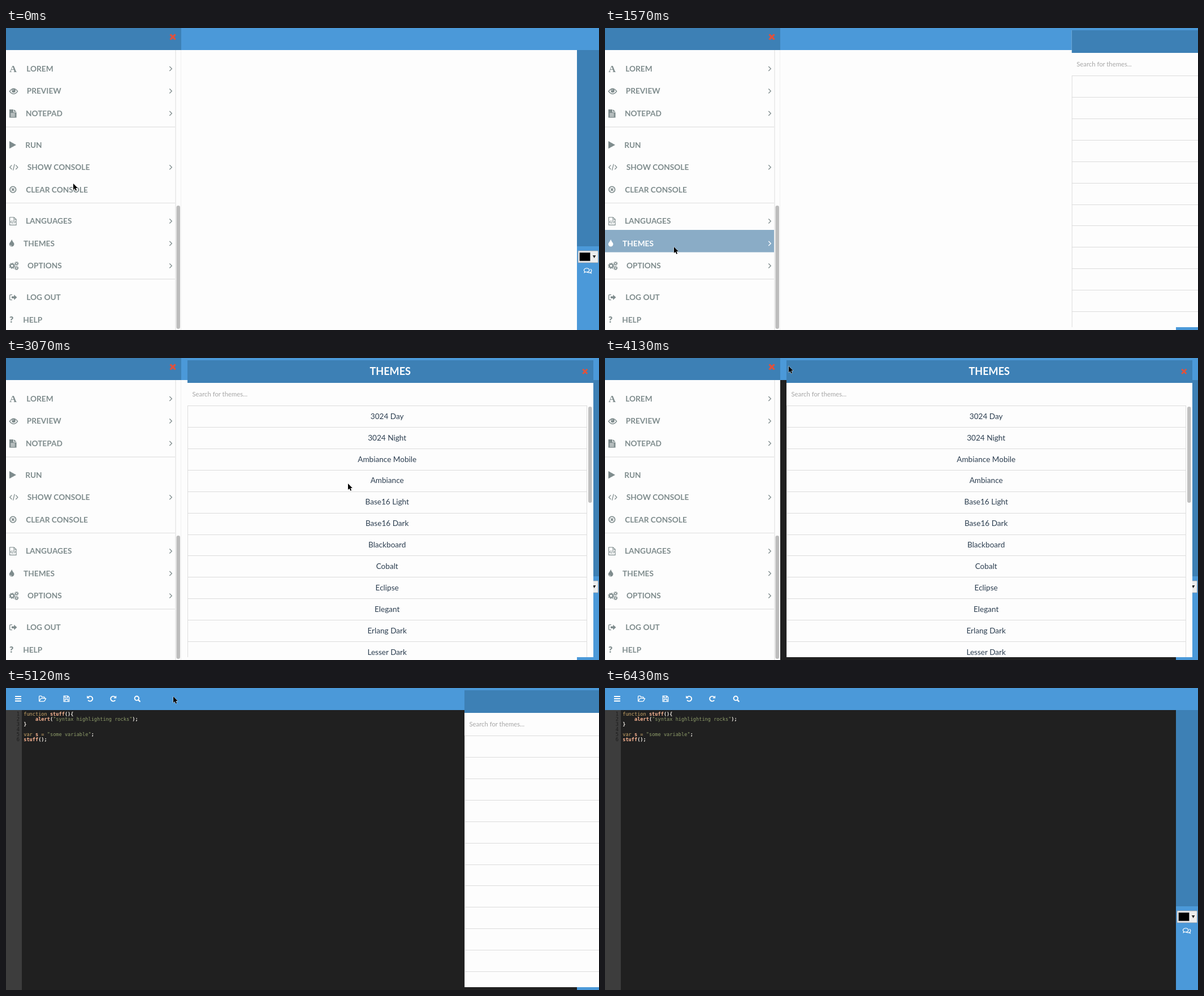
Recreate the animation shown at these times as an HTML page. Size 1049x534 px, loop 6.82 s.

```html
<!DOCTYPE html>
<html lang="en">
<head>
<meta charset="utf-8">
<title>Editor themes</title>
<style>
html, body { margin: 0; width: 100%; height: 100%; overflow: hidden; background: #fdfdfd; }
svg { display: block; width: 1049px; height: 534px; }
text { font-family: Lato, sans-serif; white-space: pre; }
.label { font-size: 13.7px; font-weight: 700; fill: currentColor; }
.theme { font-size: 13.6px; fill: #2c3e50; text-anchor: middle; }
.code text { font: 8.64px "DejaVu Sans Mono", monospace; }
.code .num { fill: #1c1c1c; text-anchor: end; }
.kw { fill: #cda869; }
.str { fill: #8f9d6a; }
.name { fill: #ffb795; font-weight: 700; }
.mark { fill: #f4efe9; font-weight: 700; }
.icon { fill: currentColor; stroke: none; }
.icon .o { fill: none; stroke: currentColor; stroke-width: 1.3; }
.icon .w { fill: none; stroke: #fdfdfd; stroke-width: 1; }
.bar { color: #fff; }
.item { color: #7f8c8d; }
.cross { stroke-width: 3.4; fill: none; stroke: #e0523d; }
</style>
</head>
<body>
<svg viewBox="0 0 1049 534">
  <rect width="1049" height="534" fill="#fdfdfd"/>
  <g id="editor">
    <rect y="39" width="1010" height="495" fill="#202020"/>
    <rect y="39" width="28" height="495" fill="#3d3d3d"/>
    <g class="code" id="code"></g>
  </g>
  <rect width="1049" height="39" fill="#4b99d9"/>
  <g class="icon bar">
    <path d="M16 14h11v2H16zM16 18h11v2H16zM16 22h11v2H16z"/>
    <path class="o" stroke-linejoin="round" d="M58.6 22.8V15.2q0-1 1-1h2.6q1 0 1 1v.6h4q1 0 1 1v1.4M58.8 23.3l2.6-4.2q.5-.8 1.4-.8h7.2q.9 0 .4.8l-2.3 3.7q-.5.8-1.4.8h-7.3q-.9 0-.6-.3z"/>
    <path class="o" d="M102.2 14.2h7.2l2.4 2.4v7.2h-9.6zM104.3 14.2v3.2h4.6v-3.2M104.3 23.8v-3.8h5.4v3.8"/>
    <g id="undo">
      <path class="o" style="stroke-width:1.9" d="M145.4 16.2A4.4 4.4 0 1 1 145.2 21.5"/>
      <path d="M143.2 13.4v4.9h4.9z"/>
    </g>
    <use href="#undo" transform="translate(338.4 0) scale(-1 1)"/>
    <circle class="o" cx="231.3" cy="18.2" r="3.7" style="stroke-width:1.9"/>
    <path class="o" style="stroke-width:2.3" stroke-linecap="round" d="M234.3 21.2l2.4 2.4"/>
  </g>
  <rect x="1010" y="39" width="39" height="347" fill="#3d80b5"/>
  <rect x="1010" y="386" width="39" height="148" fill="#4b99d9"/>
  <rect x="1012" y="394" width="35.5" height="21" fill="#ededed" stroke="#8f9aa3" stroke-width=".8"/>
  <rect x="1014.5" y="397" width="19" height="15" fill="#000" stroke="#aaa" stroke-width=".6"/>
  <path d="M1037.8 402h5.6l-2.8 5z" fill="#222"/>
  <g class="icon bar">
    <path class="o" style="stroke-width:1.2" d="M1025 431.2l-1.8 1.2.5-1.9a4.8 3.4 0 1 1 1.3.7zM1033.6 426.2a3.6 3.2 0 0 1 1 5.4l.6 2-2.3-1.2a5.4 3.2 0 0 1-4.6-.4"/>
  </g>

  <g id="panel">
    <rect x="321" y="4" width="718" height="525" fill="#fdfdfd"/>
    <rect x="321" y="4" width="718" height="40" fill="#3d80b5"/>
    <text x="679.7" y="29.6" text-anchor="middle" font-size="18.1" font-weight="700" fill="#fff">THEMES</text>
    <path class="cross" d="M1020.3 19.8l8 8m0-8l-8 8" style="stroke-width:2.9"/>
    <text x="329.5" y="68.3" font-size="11.3" fill="#a6a6a6">Search for themes...</text>
    <g id="list"></g>
    <path d="M321.5 84.5V529M1027.5 84.5V529" stroke="#ddd" fill="none"/>
    <rect x="1030" y="86" width="6.5" height="170" rx="3.2" fill="#c0c0c0"/>
  </g>

  <g id="menu">
    <rect width="310" height="534" fill="#fdfdfd"/>
    <rect width="310" height="39" fill="#3d80b5"/>
    <path id="close" class="cross" d="M290.6 11.4l9 9m0-9l-9 9"/>
    <rect x="299" y="39" width="2" height="495" fill="#ececec"/>
    <rect x="309" y="39" width="1" height="495" fill="#f0f0f0"/>
    <rect x="301.5" y="314" width="6.5" height="218" rx="3.2" fill="#bdbdbd"/>
    <path d="M0 175H299M0 309.5H299M0 444H299" stroke="#e6e6e6" stroke-width="1.4"/>
    <g id="items"></g>
  </g>

  <path id="cursor" d="M0 0V11L2.5 8.7 4.3 12.8 6.1 12 4.4 8.1H7.8Z" fill="#000" stroke="#fff" stroke-width=".9" paint-order="stroke"/>
</svg>
<script>
const $ = id => document.getElementById(id);
const LOOP = 6820;

// label, left edge, row centre, has arrow, icon drawn around the row centre
const ITEMS = [
  ["LOREM", 36.2, 72, 1, '<text x="6.3" y="5.8" style="font:700 17.5px Liberation Serif,serif">A</text>'],
  ["PREVIEW", 36.7, 111.5, 1, '<path class="o" d="M6.3 .5Q13.5-9 20.6.5Q13.5 9.5 6.3.5z"/><circle cx="13.5" cy="-.6" r="3.3"/><path class="w" d="M11.8-.8q0-1.7 1.7-1.7"/>'],
  ["NOTEPAD", 34.9, 151, 1, '<path d="M6-7h7v5h5.5v9.5H6zM14-7l4.5 4H14z"/><path class="w" d="M8.3.2h7.5M8.3 2.6h7.5M8.3 5h7.5"/>'],
  ["RUN", 34.2, 206.7, 0, '<path d="M6-6.6L18 0L6 6.6z"/>'],
  ["SHOW CONSOLE", 37.8, 246.2, 1, '<path class="o" d="M10.3-3.8L6.8 0l3.5 3.8M17.3-3.8L20.8 0l-3.5 3.8M15.2-5.5L12.5 5.5"/>'],
  ["CLEAR CONSOLE", 35.2, 285.7, 0, '<circle class="o" cx="12.3" cy="0" r="5.3" style="stroke-width:1.7"/><path class="o" style="stroke-width:1.9" d="M10.2-2.1l4.2 4.2m0-4.2l-4.2 4.2"/>'],
  ["LANGUAGES", 34.9, 341.5, 1, '<path class="o" style="stroke-width:1.1" d="M6.6-6.8h7.6l3.9 3.9v9.8H6.6zM14-6.8v4h4M10.2-.9L8.2 1.4l2 2.3M14.5-.9l2 2.3-2 2.3M13-1.6l-1.3 6"/>'],
  ["THEMES", 31, 381, 1, '<path d="M10.2-7.2Q11-4.5 13-2a4.3 4.3 0 1 1-5.7 0Q9.4-4.5 10.2-7.2z"/><path class="w" d="M8 2.6q.2 1.6 1.6 1.8"/>'],
  ["OPTIONS", 37.9, 420.5, 1, gear(10.8, 0, 3.2, 2.2) + gear(18.6, -4, 1.9, 1.4) + gear(18.6, 4, 1.9, 1.4)],
  ["LOG OUT", 36.3, 476.2, 0, '<path class="o" d="M11-4.5H8.2q-1.5 0-1.5 1.5V3q0 1.5 1.5 1.5H11"/><path d="M10-1.8h4.2v-3L19.4 0l-5.2 4.8v-3H10z"/>'],
  ["HELP", 30.2, 515.7, 0, '<text x="6" y="5.5" style="font:900 15.5px Lato,sans-serif">?</text>'],
];

function gear(x, y, r, w) {
  const tooth = 2 * Math.PI * (r + w / 2 + .5) / 16;
  return `<circle class="o" cx="${x}" cy="${y}" r="${r}" style="stroke-width:${w}"/>` +
    `<circle class="o" cx="${x}" cy="${y}" r="${r + w / 2 + .5}" stroke-dasharray="${tooth}"/>`;
}

$("items").innerHTML = ITEMS.map(([name, x, y, arrow, icon]) =>
  `<g class="item"><rect y="${y - 24}" width="299" height="39.5" fill="#8aacc6" opacity="0"/>
   <g class="icon" transform="translate(0 ${y})">${icon}
   ${arrow ? '<path class="o" d="M289.3-4l4 4-4 4"/>' : ""}</g>
   <text class="label" x="${x}" y="${y + 4.9}">${name}</text></g>`).join("");

const THEMES = ["3024 Day", "3024 Night", "Ambiance Mobile", "Ambiance", "Base16 Light", "Base16 Dark",
  "Blackboard", "Cobalt", "Eclipse", "Elegant", "Erlang Dark", "Lesser Dark"];
$("list").innerHTML = THEMES.map((name, i) => {
  const y = 84.5 + i * 37.92;
  return `<path d="M321 ${Math.floor(y) + .5}H1028" stroke="#dcdcdc"/>
    <text class="theme" x="674.2" y="${y + 23.2}">${name}</text>`;
}).join("");

// each line is a list of class:text parts
const CODE = [
  ["kw:function ", "name:stuff", "mark:(){"],
  ["name:    alert", "mark:(", 'str:"syntax highlighting rocks"', "mark:);"],
  ["mark:}"],
  [],
  ["kw:var ", "name:s ", "kw:= ", 'str:"some variable"', "mark:;"],
  ["name:stuff", "mark:();"],
];
$("code").innerHTML = CODE.map((parts, i) => {
  const y = 49 + i * 9;
  const spans = parts.map(p => {
    const cut = p.indexOf(":");
    return `<tspan class="${p.slice(0, cut)}">${p.slice(cut + 1)}</tspan>`;
  }).join("");
  return `<text class="num" x="24" y="${y}">${i + 1}</text><text x="31.2" y="${y}">${spans}</text>`;
}).join("");

// start, end, number of steps, destination
const MOVES = [
  [440, 440, 1, 121, 457],
  [620, 620, 1, 122, 387],
  [2140, 2140, 1, 175, 383],
  [2290, 2290, 1, 409, 343],
  [2560, 2830, 9, 590, 224],
  [3070, 3120, 2, 620, 220],
  [3840, 3840, 1, 536, 142],
  [4010, 4130, 3, 325, 14.5],
  [4190, 4370, 4, 296, 15],
  [5330, 5330, 1, 229, 100],
  [5510, 5510, 1, 290, 136],
  [5690, 5870, 5, 839, 448],
  [6010, 6430, 11, 998, 536],
];

// share of a stepped change done at time t
function steps(t, from, to, n) {
  if (t < from) return 0;
  if (t >= to) return 1;
  return (Math.floor((t - from) * (n - 1) / (to - from)) + 1) / n;
}
const swing = x => (1 - Math.cos(Math.PI * x)) / 2;

function cursorAt(t) {
  let x = 119, y = 275;
  for (const [from, to, n, x1, y1] of MOVES) {
    const k = steps(t, from, to, n);
    x += (x1 - x) * k;
    y += (y1 - y) * k;
    if (k < 1) break;
  }
  return [x, y];
}

const CLOSING = [[4670, 4], [4700, 12], [4910, 190], [5120, 490], [5330, 1049]];
const closeShift = t => CLOSING.reduce((d, [at, v]) => t >= at ? v : d, 0);

function openShift(t) {
  if (t < 1450) return 1049;
  if (t >= 2020) return 0;
  const at = 1450 + 84 * Math.min(5, Math.floor((t - 1450) / 84));
  return 1049 * (1 - swing((at - 1022) / 1000));
}

const mix = (a, b, k) => `rgb(${a.map((v, i) => Math.round(v + (b[i] - v) * k))})`;
const move = (el, x, y = 0) => el.setAttribute("transform", `translate(${x} ${y})`);
const items = $("items").children;

function hover(i, k) {
  items[i].style.color = mix([127, 140, 141], [255, 255, 255], k);
  items[i].firstElementChild.setAttribute("opacity", k);
}

function draw(t) {
  const shut = closeShift(t);
  move($("menu"), -shut);
  move($("panel"), openShift(t) + shut);
  $("editor").style.display = t >= 3540 ? "" : "none";
  hover(5, t < 440 ? steps(t, 50, 260, 2) : 0);
  hover(7, steps(t, 620, 820, 5) - steps(t, 2290, 2320, 2));
  $("close").style.stroke = mix([224, 82, 61], [192, 62, 48], steps(t, 4190, 4370, 4));
  move($("cursor"), ...cursorAt(t));
}

const start = performance.now();
function tick() {
  draw((performance.now() - start) % LOOP);
  requestAnimationFrame(tick);
}
draw(0);
requestAnimationFrame(tick);
</script>
</body>
</html>
```
